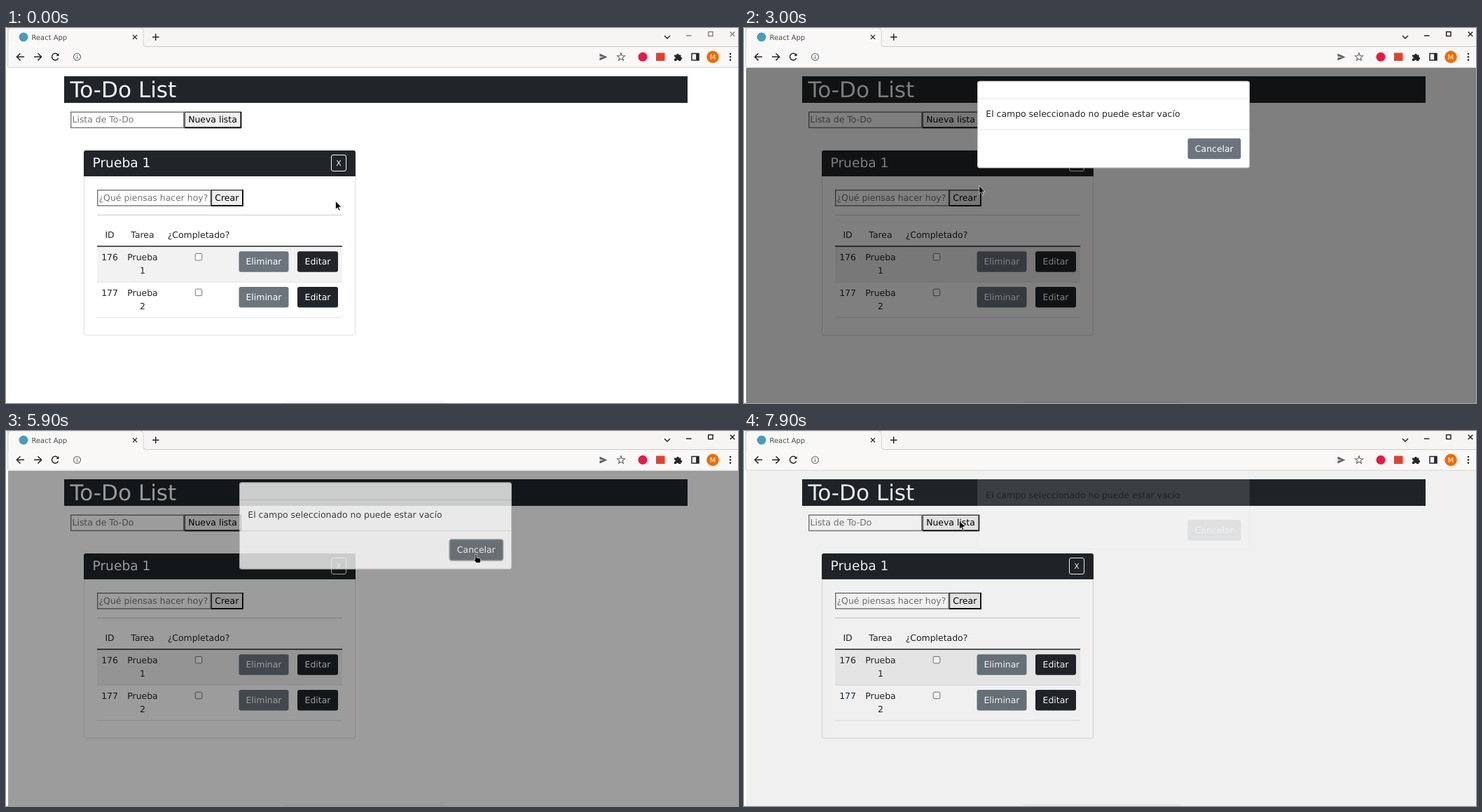
An HTML page for the animation above (8 s loop, 1045x536 px).

```html
<!DOCTYPE html>
<html lang="es">
<head>
<meta charset="utf-8">
<title>To-Do List</title>
<style>
html, body { margin: 0; width: 100%; height: 100%; overflow: hidden; background: #fff; }
svg { display: block; }
text { font: 12.45px "DejaVu Sans", sans-serif; fill: #212529; text-rendering: geometricPrecision; white-space: pre; }
.mid { text-anchor: middle; }
.light { fill: #f8f9fa; }
.hint { fill: #757575; }
.black { fill: #000; }
.dark { fill: #212529; }
.grey { fill: #6c757d; }
.icon { fill: none; stroke: #24272a; stroke-width: 1.5; }
.input { fill: #fff; stroke: #767676; stroke-width: 1.4; }
.button { fill: #efefef; stroke: #3c3c3c; stroke-width: 1.4; }
.edge { fill: none; stroke: #000; stroke-width: 1.6; }
.check { fill: #fff; stroke: #767676; }
.rule { stroke: #dee2e6; }
</style>
</head>
<body>
<svg width="1045" height="536" viewBox="0 0 1045 536">
  <!-- page -->
  <rect class="dark" x="83" y="69" width="890" height="38"/>
  <text class="light" x="91.5" y="99" style="font-size:31.1px">To-Do List</text>
  <rect class="input" x="92.7" y="120.2" width="161" height="22.3"/>
  <text class="hint" x="94.5" y="135.3">Lista de To-Do</text>
  <rect class="button" x="255.2" y="120.2" width="80.3" height="22.3"/>
  <path class="edge" d="M255 142.4H335.4V120"/>
  <text class="mid black" x="295" y="135.3">Nueva lista</text>

  <rect x="111.5" y="175.5" width="387" height="263.7" rx="3" fill="#fff" stroke="#dfdfdf"/>
  <path class="dark" d="M111 212V178q0-3 3-3H496q3 0 3 3V212z"/>
  <text class="light" x="123.5" y="199" style="font-size:18.67px">Prueba 1</text>
  <rect x="464.5" y="181.5" width="21" height="23" rx="2.5" fill="none" stroke="#f8f9fa"/>
  <text class="mid light" x="475" y="197" style="font-size:10.9px">X</text>

  <rect class="input" x="130.7" y="231.7" width="161.5" height="22.3"/>
  <text class="hint" x="132.5" y="246.7">¿Qué piensas hacer hoy?</text>
  <rect class="button" x="293.4" y="231.7" width="44.6" height="22.3"/>
  <path class="edge" d="M293 253.9H337.9V231"/>
  <text class="mid black" x="315.3" y="246.7">Crear</text>
  <path d="M130 267.3H480" stroke="#c8c9ca"/>

  <text class="mid" x="148" y="300">ID</text>
  <text class="mid" x="195" y="300">Tarea</text>
  <text class="mid" x="275" y="300">¿Completado?</text>
  <rect x="130" y="312" width="350" height="51" fill="#f2f2f2"/>
  <path d="M130 312H480" stroke="#212529" stroke-width="1.7"/>
  <path class="rule" d="M130 363.2H480M130 413.8H480"/>
  <g id="rows"></g>
  <rect x="397" y="533.5" width="231" height="8" rx="6" fill="#f5f5f5"/>

  <!-- dialog -->
  <rect id="backdrop" x="3" y="57" width="1042" height="479"/>
  <g id="modal">
    <rect x="333" y="80" width="389" height="124.5" rx="3.7" fill="#fff"/>
    <path class="rule" d="M333.5 105.3H721.5M333.5 149.6H721.5"/>
    <rect x="333.5" y="80.5" width="388" height="123.5" rx="3.5" fill="none" stroke="#000" stroke-opacity=".2"/>
    <text x="345.3" y="131">El campo seleccionado no puede estar vacío</text>
    <rect id="ring" x="632.8" y="161.5" width="77" height="30.8" rx="3.6" fill="none" stroke="#b4b9bd" stroke-width="1.5"/>
    <rect id="cancel" x="633.5" y="162.2" width="75.8" height="29.5" rx="3"/>
    <text class="mid" x="671.3" y="181.3" style="fill:#fff">Cancelar</text>
  </g>

  <!-- browser -->
  <rect width="1045" height="56.5" fill="#f6f5f4"/>
  <rect width="2.5" height="536" fill="#fff"/>
  <path d="M2.5 0V56" stroke="#d2cfcc"/>
  <path d="M3 56.3V26.5H1045V56.3z" fill="#f9f8f7"/>
  <path d="M3 56.2H1045" stroke="#d8d4d0"/>
  <path d="M3 27V4q0-4 4-4H192q4 0 4 4V23q0 3.5 4 3.5H1045" fill="none" stroke="#cfcac5"/>
  <path d="M3.5 28V4q0-3.5 3.5-3.5H192q3.5 0 3.5 3.5V28z" fill="#f9f8f7"/>
  <circle cx="25" cy="13" r="6.5" fill="#4b9bbd"/>
  <text x="36.5" y="16.8" style="font-size:9.95px;fill:#45494d">React App</text>
  <g class="icon">
    <path d="M181 10l6 6m0-6l-6 6" stroke-width="1.2"/>
    <path d="M209 13H218.5M213.7 8.3V17.8"/>
    <path d="M940 11l4 4 4-4"/>
    <path d="M26 41.3H15.5M20.5 36.2l-5.1 5.1 5.1 5.1M40 41.3H50.5M45.500 36.2l5.100 5.100-5.100 5.100"/>
    <path d="M74.200 38.300A4.800 4.800 0 1 0 74.700 43"/>
    <path d="M75.500 36v4h-4z" fill="#24272a" stroke="none"/>
    <g stroke="#5f6368" stroke-width="1.1">
      <circle cx="101.500" cy="41.300" r="5"/>
      <path d="M101.500 40.500v3.500M101.500 38.200v1.200"/>
      <path d="M847.500 36.500l11 5-11 5v-4l6-1-6-1z" fill="#5f6368" stroke="none"/>
      <path id="star"/>
    </g>
    <path d="M979 36.500h10v9.500h-10zM986 36.500v9.500"/>
    <path d="M985.500 36.500h3.500v9.500h-3.500z" fill="#24272a" stroke="none"/>
  </g>
  <circle cx="909" cy="41.300" r="6.500" fill="#ec1744"/>
  <rect x="928" y="35.500" width="12.500" height="11.500" fill="#df4330"/>
  <path d="M954 38.500h3.200a1.800 1.800 0 1 1 3.600 0h2.700v3.200a1.700 1.700 0 1 1 0 3.400v2h-3.200a1.700 1.700 0 0 0-3.400 0H954v-3a1.700 1.700 0 0 0 0-3.400z" fill="#24272a"/>
  <circle cx="1009" cy="41.300" r="8.700" fill="#ef6c00"/>
  <text class="mid" x="1009" y="45" style="font-size:9.800px;fill:#fff">M</text>
  <g fill="#24272a">
    <circle cx="1034" cy="37" r="1.300"/><circle cx="1034" cy="41.300" r="1.300"/><circle cx="1034" cy="45.600" r="1.300"/>
  </g>
  <path id="controls" d="M971 11H978.500M1002.700 5.500h6.300v6h-6.300zM1033.800 5.500l6.500 6.500m0-6.500l-6.500 6.500" fill="none" stroke-width="1.500"/>

  <!-- pointer -->
  <g id="pointer">
    <path id="arrow" d="M.5.3V12.200L3.200 9.700 5.200 14 7 13.200 5.100 9H8.800z" stroke="#fff" stroke-width=".7"/>
    <path id="hand" d="M.8 1Q2 -.6 3 1V5L7.500 6Q9 6.500 8.700 8.500L8 12.500H2.500L-1 8.200Q-.8 6.600 .8 7.500z" stroke="#fff" stroke-width=".7"/>
    <g id="beam" fill="none">
      <path d="M-2.500-6.300H2.500M0-6.300V6.300M-2.500 6.300H2.500" stroke="#fff" stroke-width="2.600"/>
      <path d="M-2.500-6.300H2.500M0-6.300V6.300M-2.500 6.300H2.500" stroke="#000"/>
    </g>
  </g>
</svg>
<script>
const LOOP = 8000, STEP = 100, FADE = 150, SLIDE = 300, DROP = 39;
const $ = id => document.getElementById(id);

const button = (x, y, w, cls, label) =>
  `<rect class="${cls}" x="${x}" y="${y}" width="${w}" height="29.5" rx="3"/>
   <text class="mid" style="fill:#fff" x="${x + w / 2}" y="${y + 19}">${label}</text>`;

$("rows").innerHTML = [1, 2].map(n => {
  const y = 312.4 + (n - 1) * 50.7;
  return `<text class="mid" x="148" y="${y + 20}">${175 + n}</text>
    <text class="mid" x="195" y="${y + 20}">Prueba</text>
    <text class="mid" x="195" y="${y + 38.7}">${n}</text>
    <rect class="check" x="270.2" y="${y + 10}" width="9.6" height="9.6" rx="1.8"/>` +
    button(332.5, y + 6.8, 71, "grey", "Eliminar") +
    button(416, y + 6.8, 58, "dark", "Editar");
}).join("");

$("star").setAttribute("d", "M" + Array.from({ length: 10 }, (_, i) => {
  const r = i % 2 ? 2.5 : 5.8, a = i * Math.PI / 5;
  return `${878 + r * Math.sin(a)} ${41.6 - r * Math.cos(a)}`;
}).join("L") + "z");

// Pointer moves: start, end, x, y, shape on arrival
const moves = [
  [0, 0, 470, 247, "arrow"],
  [100, 200, 470, 246, "arrow"],
  [400, 800, 452, 246, "arrow"],
  [1400, 1800, 446, 276, "arrow"],
  [2100, 2400, 327, 243, "hand"],
  [2800, 2900, 327, 243, "arrow"],
  [2900, 3500, 376, 135, "arrow"],
  [3700, 4000, 378.5, 132, "beam"],
  [4000, 4500, 600, 129, "beam"],
  [4600, 4900, 686, 133, "arrow"],
  [5000, 5300, 671, 163, "arrow"],
  [5500, 5600, 669, 176, "hand"],
  [5900, 6000, 669, 176, "arrow"],
  [6300, 6500, 540, 199, "arrow"],
  [6500, 6700, 404, 162, "arrow"],
  [6800, 7400, 307, 128, "hand"],
  [7800, 7900, 307, 128, "arrow"]
];

function pointerAt(t) {
  let x, y, shape;
  for (const [start, end, toX, toY, kind] of moves) {
    if (t < start) break;
    const p = end > start ? Math.min(1, (t - start) / (end - start)) : 1;
    x = p < 1 ? x + (toX - x) * p : toX;
    y = p < 1 ? y + (toY - y) * p : toY;
    if (p === 1) shape = kind;
    else break;
  }
  return { x, y, shape };
}

// cubic-bezier(0, 0, .58, 1)
function easeOut(p) {
  if (p >= 1) return 1;
  let lo = 0, hi = 1;
  for (let i = 0; i < 24; i++) {
    const s = (lo + hi) / 2;
    if (1.74 * (1 - s) * s * s + s ** 3 < p) lo = s;
    else hi = s;
  }
  return 3 * (1 - lo) * lo * lo + lo ** 3;
}

function modalAt(t) {
  const phase = (start, closing) => {
    const fade = Math.min(1, (t - start) / FADE), slide = easeOut((t - start) / SLIDE);
    return closing ? { alpha: 1 - fade, dy: -DROP * slide } : { alpha: fade, dy: DROP * (slide - 1) };
  };
  if (t >= 7900) return phase(7882);
  if (t >= 2900 && t < 5900) return phase(2783);
  if (t >= 5900 && t < 6100) return phase(5867, true);
  return { alpha: 0, dy: 0 };
}

function draw(now) {
  const t = Math.floor(now % LOOP / STEP) * STEP;
  const { alpha, dy } = modalAt(t);
  $("backdrop").setAttribute("opacity", alpha / 2);
  $("modal").setAttribute("opacity", alpha);
  $("modal").setAttribute("transform", `translate(0 ${dy})`);
  const pressed = t >= 5600 && t < 6100;
  $("cancel").setAttribute("fill", pressed ? "#5c636a" : "#6c757d");
  $("ring").setAttribute("opacity", t >= 5900 && t < 6100 ? 1 : 0);
  $("controls").setAttribute("stroke", t < 2900 ? "#85888a" : "#24272a");

  const { x, y, shape } = pointerAt(t);
  $("pointer").setAttribute("transform", `translate(${x} ${y})`);
  for (const id of ["arrow", "hand", "beam"]) $(id).style.display = id === shape ? "" : "none";
}

const begin = performance.now();
function tick() {
  draw(performance.now() - begin);
  requestAnimationFrame(tick);
}
tick();
</script>
</body>
</html>
```
